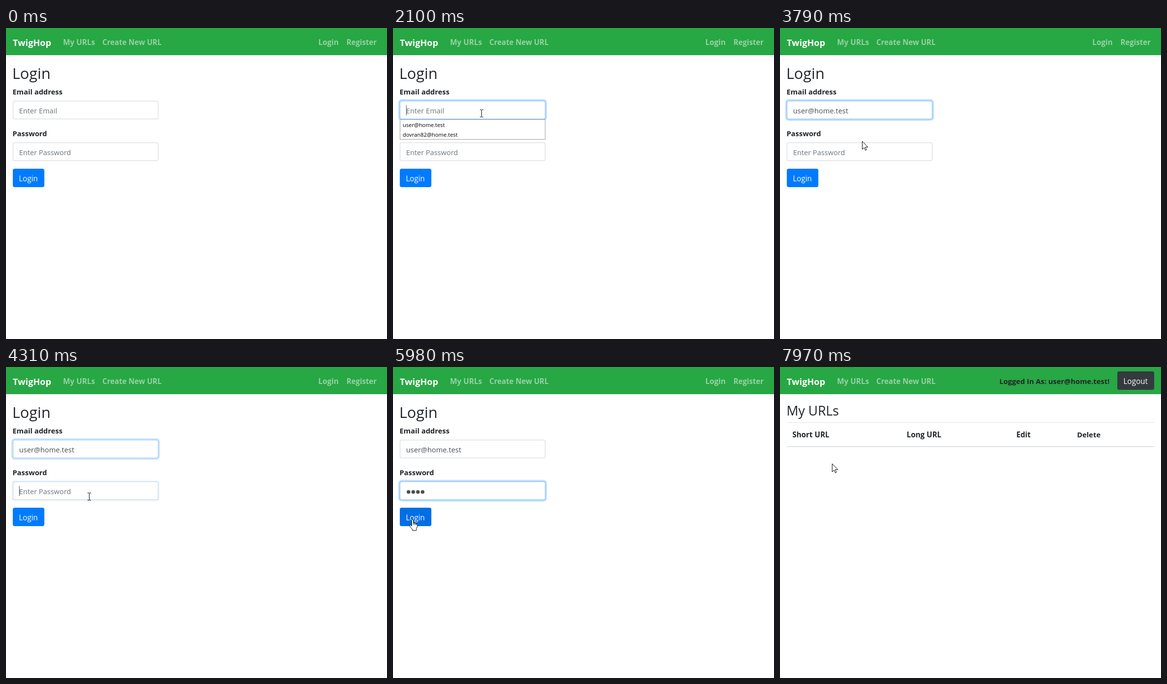
These frames come from a looping animation (785x641 px, 8000 ms). An HTML page with a canvas:

```html
<!DOCTYPE html>
<html lang="en">
<head>
<meta charset="utf-8">
<title>Login</title>
<style>
html, body { margin: 0; width: 100%; height: 100%; overflow: hidden; background: #fff; }
canvas { display: block; width: 785px; height: 641px; }
</style>
</head>
<body>
<canvas id="stage" width="785" height="641"></canvas>
<script>
const ctx = document.getElementById('stage').getContext('2d');
const LOOP = 8000;
const FONT = '"Open Sans", "Noto Sans", sans-serif';
const BRAND = 'TwigHop';
const EMAIL = 'user@home.test';
const OTHER = 'dovran82@home.test';
const INK = '#212529', VALUE = '#495057', HINT = '#6c757d', DIM = 'rgba(255,255,255,.5)';

const ENTER = 670, FOCUS_EMAIL = 1840, LIST_OPEN = 2040, PICK = 3120;
const FOCUS_PASS = 4265, HOVER = 5890, PRESS = 6200, RELEASE = 6300, LOGGED_IN = 6700;
const EMAIL_KEYS = [2300, 2500, 2680, 2820];
const PASS_KEYS = [5170, 5320, 5530, 5680];

// Pointer moves: start, end, from x, from y, to x, to y, eased
const MOVES = [
  [670, 1440, 605, 626, 182, 188, true],
  [1440, 1540, 182, 188, 182, 179],
  [1840, 1890, 182, 179, 182, 176],
  [2300, 2600, 182, 176, 171, 190, true],
  [3540, 3790, 171, 190, 169, 233],
  [3790, 4190, 169, 233, 171, 267],
  [5690, 5940, 171, 267, 38, 314, true],
  [7770, 7970, 38, 314, 107, 199]
];

const clamp = v => Math.max(0, Math.min(1, v));
const ease = u => u * u * (3 - 2 * u);
const fade = (t, start) => ease(clamp((t - start) / 150));
const countKeys = (keys, t) => keys.filter(k => t >= k).length;

function text(str, x, y, size, color, weight = 400, align = 'left') {
  ctx.font = `${weight} ${size}px ${FONT}`;
  ctx.textAlign = align;
  ctx.fillStyle = color;
  ctx.fillText(str, x, y);
}

function rect(x, y, w, h, color) {
  ctx.fillStyle = color;
  ctx.fillRect(x, y, w, h);
}

function rounded(x, y, w, h, r, color) {
  ctx.beginPath();
  ctx.roundRect(x, y, w, h, r);
  ctx.fillStyle = color;
  ctx.fill();
}

// Focus ring around a box
function ring(x, y, w, h, color) {
  ctx.beginPath();
  ctx.roundRect(x - 3.2, y - 3.2, w + 6.4, h + 6.4, 7.2);
  ctx.roundRect(x, y, w, h, 4);
  ctx.fillStyle = color;
  ctx.fill('evenodd');
}

function field(y, focus) {
  rounded(14, y, 300, 38, 4, '#ced4da');
  if (focus > 0) {
    rounded(14, y, 300, 38, 4, `rgba(128,189,255,${focus})`);
    ring(14, y, 300, 38, `rgba(0,123,255,${0.25 * focus})`);
  }
  rounded(15, y + 1, 298, 36, 3, '#fff');
}

function caret(x, y, t, since) {
  if ((t - since) % 1000 < 500) rect(Math.round(x), y, 1, 21, VALUE);
}

function navbar() {
  rect(0, 0, 785, 56, '#28a745');
  text(BRAND, 14, 37, 18.4, '#fff', 700);
  text('My URLs', 117.5, 35, 15.5, DIM, 700);
  text('Create New URL', 198.5, 35, 15.2, DIM, 700);
}

function emailField(t) {
  field(150, fade(t, FOCUS_EMAIL) - fade(t, FOCUS_PASS));
  const n = countKeys(EMAIL_KEYS, t);
  const typed = t >= PICK ? EMAIL : EMAIL.slice(0, n);
  if (typed) text(typed, 27, 176, 14.8, VALUE);
  else text('Enter Email', 27, 176, 14.8, HINT);
  if (t >= FOCUS_EMAIL && t < FOCUS_PASS) {
    const since = t >= PICK ? PICK : n ? EMAIL_KEYS[n - 1] : FOCUS_EMAIL;
    ctx.font = `400 14.8px ${FONT}`;
    caret(27 + ctx.measureText(typed).width, 159, t, since);
  }
}

function passwordField(t) {
  field(236, fade(t, FOCUS_PASS) - fade(t, PRESS));
  const n = countKeys(PASS_KEYS, t);
  if (!n) text('Enter Password', 27, 262, 14.75, HINT);
  for (let i = 0; i < n; i++) {
    ctx.beginPath();
    ctx.arc(32 + i * 9.65, 257.5, 3.8, 0, 7);
    ctx.fillStyle = VALUE;
    ctx.fill();
  }
  if (t >= FOCUS_PASS && t < HOVER) {
    caret(27 + n * 9.7, 245, t, n ? PASS_KEYS[n - 1] : FOCUS_PASS);
  }
}

function loginButton(t) {
  rounded(14, 290, 65, 38, 4, '#007bff');
  rounded(14, 290, 65, 38, 4, `rgba(0,105,217,${fade(t, HOVER)})`);
  const down = fade(t, PRESS) - fade(t, RELEASE);
  if (down > 0) rounded(14, 290, 65, 38, 4, `rgba(0,98,204,${down})`);
  ring(14, 290, 65, 38, `rgba(38,143,255,${0.5 * fade(t, PRESS)})`);
  text('Login', 26.5, 316, 15.4, '#fff');
}

function suggestions(t, pointer) {
  if (t < LIST_OPEN || t >= PICK) return;
  const rows = t < EMAIL_KEYS[0] ? [EMAIL, OTHER] : [EMAIL];
  const h = rows.length * 20 + 2;
  rect(14, 188, 300, h, '#9b9b9b');
  rect(15, 189, 298, h - 2, '#fff');
  if (pointer.y >= 189) rect(15, 189, 298, 20, '#d3d3d3');
  rows.forEach((row, i) => text(row, 20, 204 + i * 20, 11.3, '#000'));
}

function loginPage(t, pointer) {
  text('Login', 643.5, 35, 15.5, DIM, 700);
  text('Register', 701.5, 35, 15.2, DIM, 700);
  text('Login', 13, 105, 31, INK);
  text('Email address', 13.5, 137, 14.9, INK, 700);
  text('Password', 13.5, 223, 14.9, INK, 700);
  emailField(t);
  passwordField(t);
  loginButton(t);
  suggestions(t, pointer);
}

function urlsPage() {
  text(`Logged In As: ${EMAIL}!`, 679, 35, 14.9, INK, 700, 'right');
  rounded(695, 9, 76, 38, 4, '#343a40');
  text('Logout', 707.5, 35, 15.5, '#fff');
  text('My URLs', 13.5, 100, 26.9, INK);
  rect(14, 114, 757, 1, '#dee2e6');
  rect(14, 163, 757, 2, '#dee2e6');
  text('Short URL', 25.5, 145, 15.4, INK, 700);
  text('Long URL', 261, 145, 15.4, INK, 700);
  text('Edit', 487, 145, 15.2, INK, 700);
  text('Delete', 612, 145, 14.9, INK, 700);
}

function pointerAt(t) {
  const move = MOVES.filter(m => t >= m[0]).pop();
  if (!move) return { x: -99, y: -99 };
  const [start, end, x0, y0, x1, y1, eased] = move;
  const u = clamp(Math.floor((t - start) / 50) * 50 / (end - start));
  const k = eased ? ease(u) : u;
  return { x: Math.round(x0 + (x1 - x0) * k), y: Math.round(y0 + (y1 - y0) * k) };
}

function pointerShape(t, { x, y }) {
  if (t >= LOGGED_IN) return 'arrow';
  const inside = (top, right) => x >= 14 && x <= right && y >= top && y <= top + 38;
  if (inside(290, 79)) return 'hand';
  return inside(150, 314) || inside(236, 314) ? 'beam' : 'arrow';
}

const ARROW = new Path2D('M0 0V16.5L3.9 13L6.4 18.6L8.8 17.5L6.4 12H11.6Z');
const HAND = new Path2D('M0 2Q0 0 1.8 0Q3.5 0 3.5 2V7Q5 5.8 6.3 7.4Q8 6.6 9 8.4Q11.6 8 11.6 11V14.5L9.6 19V22.5H1.6V20.5L-2.8 15Q-5 12.3 -4 11.3Q-2.4 10.2 0 13.3Z');

function drawPointer(t, p) {
  if (t < ENTER) return;
  const shape = pointerShape(t, p);
  ctx.save();
  ctx.translate(p.x, p.y);
  if (shape === 'beam') {
    for (const y of [-8, 7]) {
      rect(-3, y, 3, 1, '#000');
      rect(1, y, 3, 1, '#000');
    }
    rect(0, -7, 1, 14, '#000');
  } else {
    const path = shape === 'hand' ? HAND : ARROW;
    ctx.translate(0.5, 0.5);
    ctx.lineWidth = 1;
    ctx.lineJoin = 'round';
    ctx.fillStyle = '#fff';
    ctx.strokeStyle = '#000';
    ctx.fill(path);
    ctx.stroke(path);
    if (shape === 'hand') {
      ctx.stroke(new Path2D('M3.5 7V11M6.3 7.4V11M9 8.4V11.5'));
    }
  }
  ctx.restore();
}

function draw(t) {
  const pointer = pointerAt(t);
  rect(0, 0, 785, 641, '#fff');
  navbar();
  if (t < LOGGED_IN) loginPage(t, pointer);
  else urlsPage();
  drawPointer(t, pointer);
}

const begin = performance.now();
function tick() {
  draw((performance.now() - begin) % LOOP);
  requestAnimationFrame(tick);
}
tick();
</script>
</body>
</html>
```
